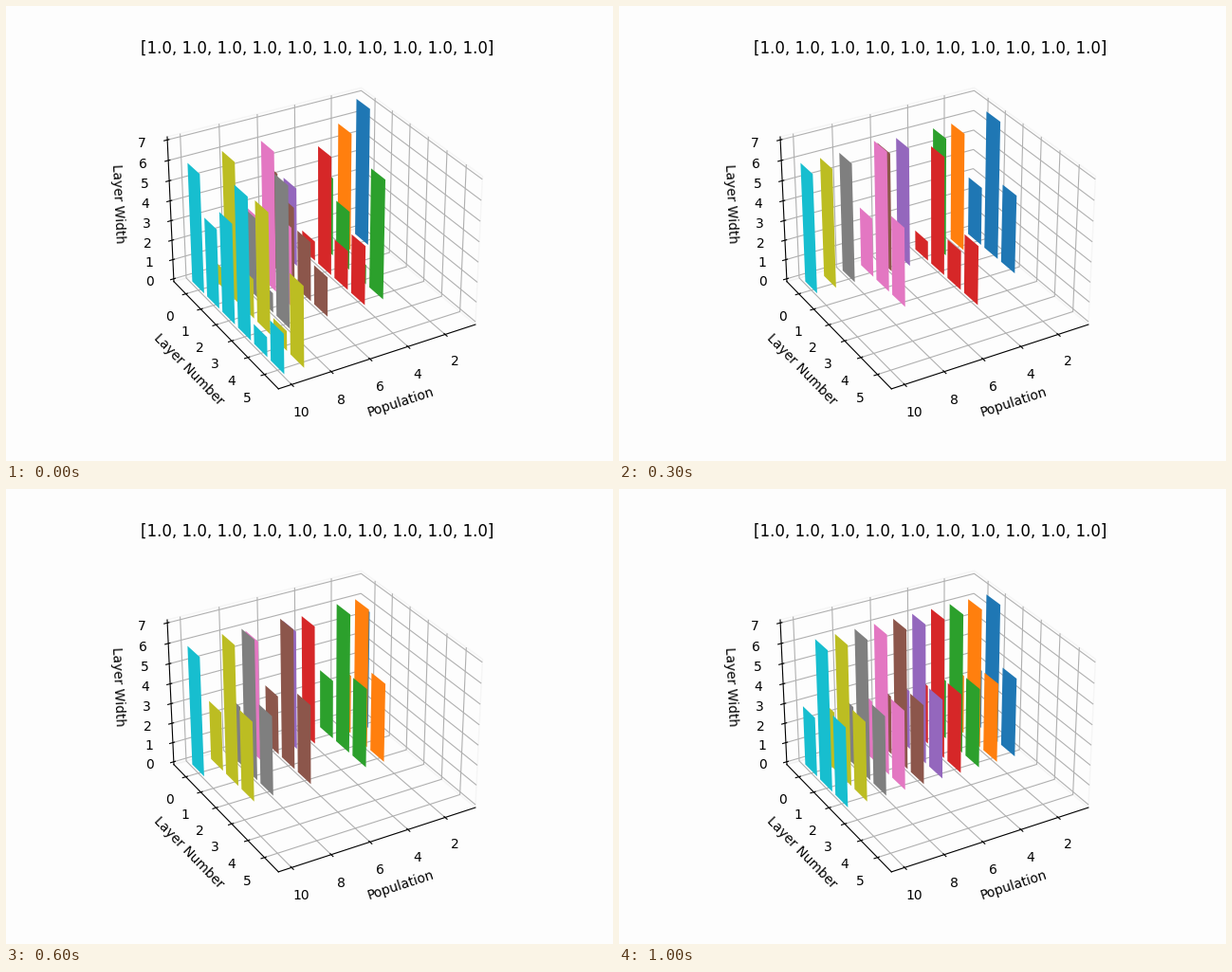
Recreate the animation shown at these times as a matplotlib script. Size 640 by 480 pixels, loop 5100 ms.

```python
import matplotlib.pyplot as plt
from matplotlib.animation import FuncAnimation

STEP_MS = 100
STEPS = 51
POP = 10
BG = "#fdfdfd"

WIDE = [3, 7, 4]
FLAT = [6]
DEEP = [1, 6, 2, 3]

START = [[7], FLAT, [4, 3, 1, 6], DEEP, [4], [5, 4, 3, 2], WIDE,
         [3, 4, 1, 7], [1, 7, 2, 6, 1, 4], [6, 4, 5, 7, 1, 2]]


def mix(wide, **special):
    """Population where the listed members are WIDE and the rest FLAT."""
    nets = [WIDE if k in wide else FLAT for k in range(1, POP + 1)]
    for key, net in special.items():
        nets[int(key[1:]) - 1] = net
    return nets


everyone = set(range(1, POP + 1))
generations = [
    START,
    mix({7}, m1=[7], m4=DEEP, m5=[4]),
    mix({1, 7}, m5=DEEP),
    mix({1, 7}, m4=DEEP),
    mix({1, 7}),
    mix({4, 8, 10}),
    mix({2, 3, 6, 8, 9}),
    mix(everyone - {4, 10}),
    mix(everyone - {5, 10}),
    mix(everyone - {10}),
    mix(everyone),
]

fig = plt.figure(figsize=(6.4, 4.8), dpi=100, facecolor=BG)
ax = fig.add_subplot(projection="3d", facecolor=BG)
ax.view_init(elev=30, azim=60)
ax.set_title(str([1.0] * POP))
ax.set_xlabel("Population")
ax.set_ylabel("Layer Number")
ax.set_zlabel("Layer Width")


def padded(low, high, margin):
    pad = (high - low) * margin
    return low - pad, high + pad


EDGE = 1 / 48
ax.set_xticks(range(2, 11, 2))
ax.set_yticks(range(6))
ax.set_zticks(range(8))
ax.set_xlim(padded(*padded(1, POP, 0.05), EDGE))
ax.set_ylim(padded(*padded(-0.4, 5.4, 0.05), EDGE))
ax.set_zlim(padded(0, 7, EDGE))
for axis in (ax.xaxis, ax.yaxis, ax.zaxis):
    axis.pane.set_fill(False)
    axis.pane.set_edgecolor("#eeeeee")

bars = []


def draw(step):
    while bars:
        bars.pop().remove()
    nets = generations[min(step, len(generations) - 1)]
    for k, net in enumerate(nets):
        bars.extend(ax.bar(range(len(net)), net, zs=k + 1, zdir="x",
                           color=f"C{k}"))
    return bars


anim = FuncAnimation(fig, draw, frames=STEPS, init_func=lambda: draw(0),
                     interval=STEP_MS, repeat=True, repeat_delay=0)
plt.show()
```
